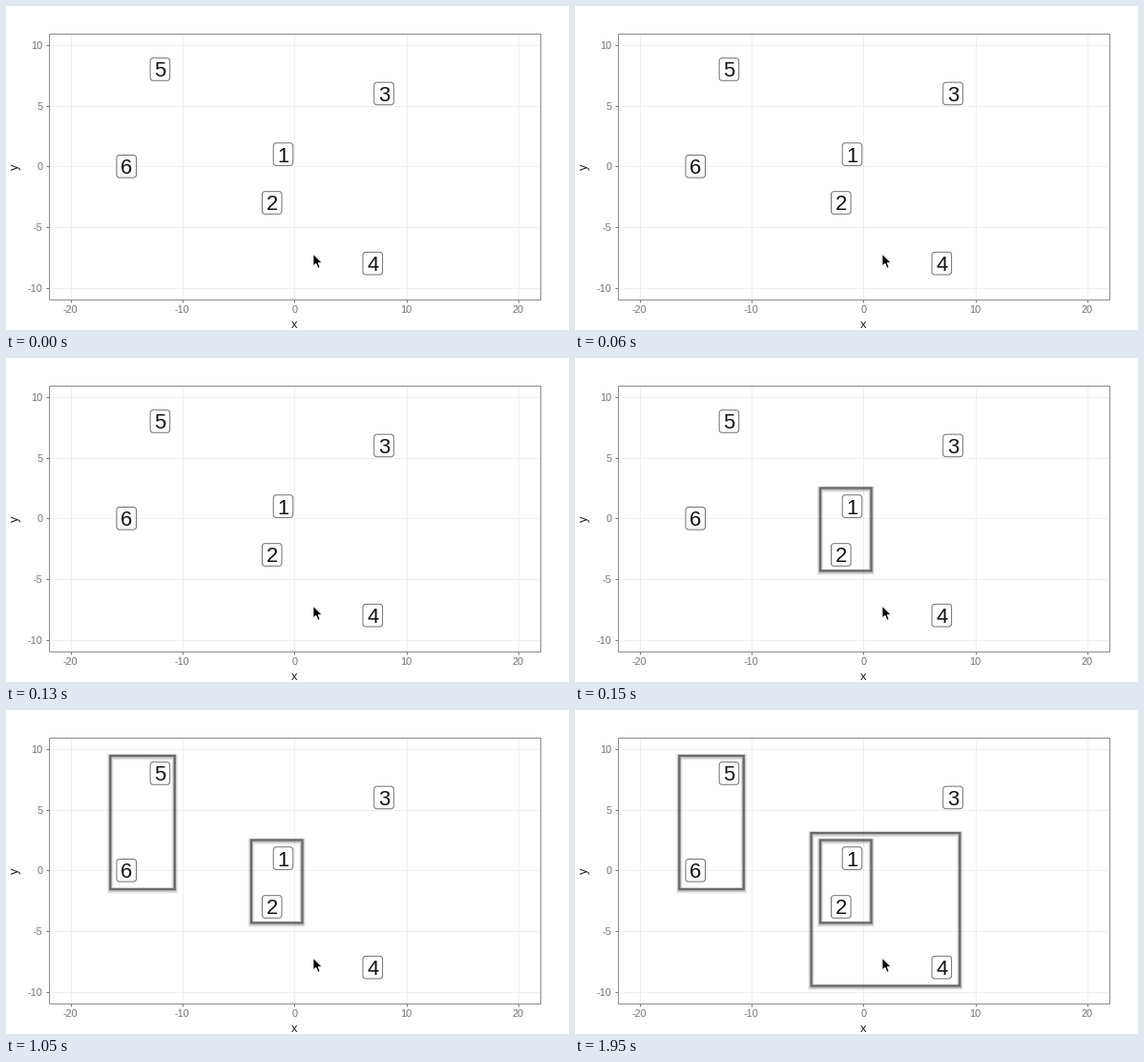
Recreate the animation shown at these times as a matplotlib script. Size 590 by 340 pixels, loop 1980 ms.

```python
import matplotlib.pyplot as plt
from matplotlib.animation import FuncAnimation
from matplotlib.patches import FancyBboxPatch, Polygon, Rectangle

W, H, DPI = 590, 340, 100
INTERVAL, FRAMES = 30, 66
PT = 72 / DPI  # points per pixel

plt.rcParams["font.family"] = "Liberation Sans"
fig = plt.figure(figsize=(W / DPI, H / DPI), dpi=DPI, facecolor="white")
ax = fig.add_axes([0, 0, 1, 1])
ax.set_xlim(0, W)
ax.set_ylim(H, 0)
ax.axis("off")

LEFT, RIGHT, TOP, BOTTOM = 44.5, 560, 28.5, 308
GRID, BORDER, TICK_TEXT = "#f0f0f0", "#8c8c8c", "#757575"


def px(x):
    return 302.2 + 11.73 * x


def py(y):
    return 168.3 - 12.73 * y


def line(x0, y0, x1, y1, color, width=1):
    ax.plot([x0, x1], [y0, y1], color=color, lw=width * PT,
            solid_capstyle="butt", zorder=1)


def text(x, y, label, size, color, **kwargs):
    options = dict(ha="center", va="baseline", zorder=6) | kwargs
    ax.text(x, y, label, fontsize=size * PT, color=color, **options)


def draw_axes():
    for value in range(-20, 21, 10):
        x = px(value)
        line(x, TOP, x, BOTTOM, GRID)
        line(x, BOTTOM, x, BOTTOM + 3, "#777777")
        text(x, 322.5, str(value), 11, TICK_TEXT)
    for value in range(-10, 11, 5):
        y = py(value)
        line(LEFT, y, RIGHT, y, GRID)
        line(LEFT - 3, y, LEFT, y, "#777777")
        text(38.5, y + 4, str(value), 11, TICK_TEXT, ha="right")
    ax.add_patch(Rectangle((LEFT, TOP), RIGHT - LEFT, BOTTOM - TOP,
                           fill=False, ec=BORDER, lw=PT, zorder=2))
    text(302, 338.5, "x", 13, "#222222")
    text(9.5, 168.5, "y", 13, "#222222", rotation=90, va="center")


def draw_label(name, x, y):
    cx, cy = px(x), py(y)
    ax.add_patch(FancyBboxPatch(
        (cx - 10.3, cy - 11.8), 20.6, 23.6,
        boxstyle="round,pad=0,rounding_size=3",
        fc="white", ec="#707070", lw=PT, zorder=5))
    text(cx, cy + 8, name, 22, "#111111")


def draw_cursor(x, y):
    outline = [(0, 0), (0, 12.6), (2.9, 10), (5, 14.8),
               (7.1, 13.9), (5.1, 9.2), (9, 9)]
    ax.add_patch(Polygon([(x + dx, y + dy) for dx, dy in outline],
                         fc="black", ec="white", lw=0.8 * PT, zorder=8))


def make_cluster(x0, y0, x1, y1):
    """Grey outline with a soft shadow just below it."""
    layers = [(7, 0.05, 1.2, "black"), (5, 0.10, 1, "black"),
              (3.5, 0.14, 0.7, "black"), (2.2, 1, 0, "#6a6a6a")]
    return [ax.add_patch(Rectangle(
        (x0, y0 + drop), x1 - x0, y1 - y0, fill=False, ec=color,
        alpha=alpha, lw=width * PT, joinstyle="miter", snap=False, zorder=3))
        for width, alpha, drop, color in layers]


draw_axes()
for name, x, y in [("1", -1, 1), ("2", -2, -3), ("3", 8, 6),
                   ("4", 7, -8), ("5", -12, 8), ("6", -15, 0)]:
    draw_label(name, x, y)
draw_cursor(322, 260.3)

# Each cluster outline with the time (ms) at which it appears.
clusters = [
    (150, make_cluster(257, 136.5, 310.5, 223.3)),
    (1050, make_cluster(109.3, 48, 176.8, 188)),
    (1950, make_cluster(247.6, 129, 403.2, 289.5)),
]


def update(frame):
    now = frame * INTERVAL
    for start, patches in clusters:
        for patch in patches:
            patch.set_visible(now >= start)
    return [patch for _, patches in clusters for patch in patches]


animation = FuncAnimation(fig, update, frames=FRAMES, interval=INTERVAL,
                          repeat=True, repeat_delay=0, blit=False)
plt.show()
```
